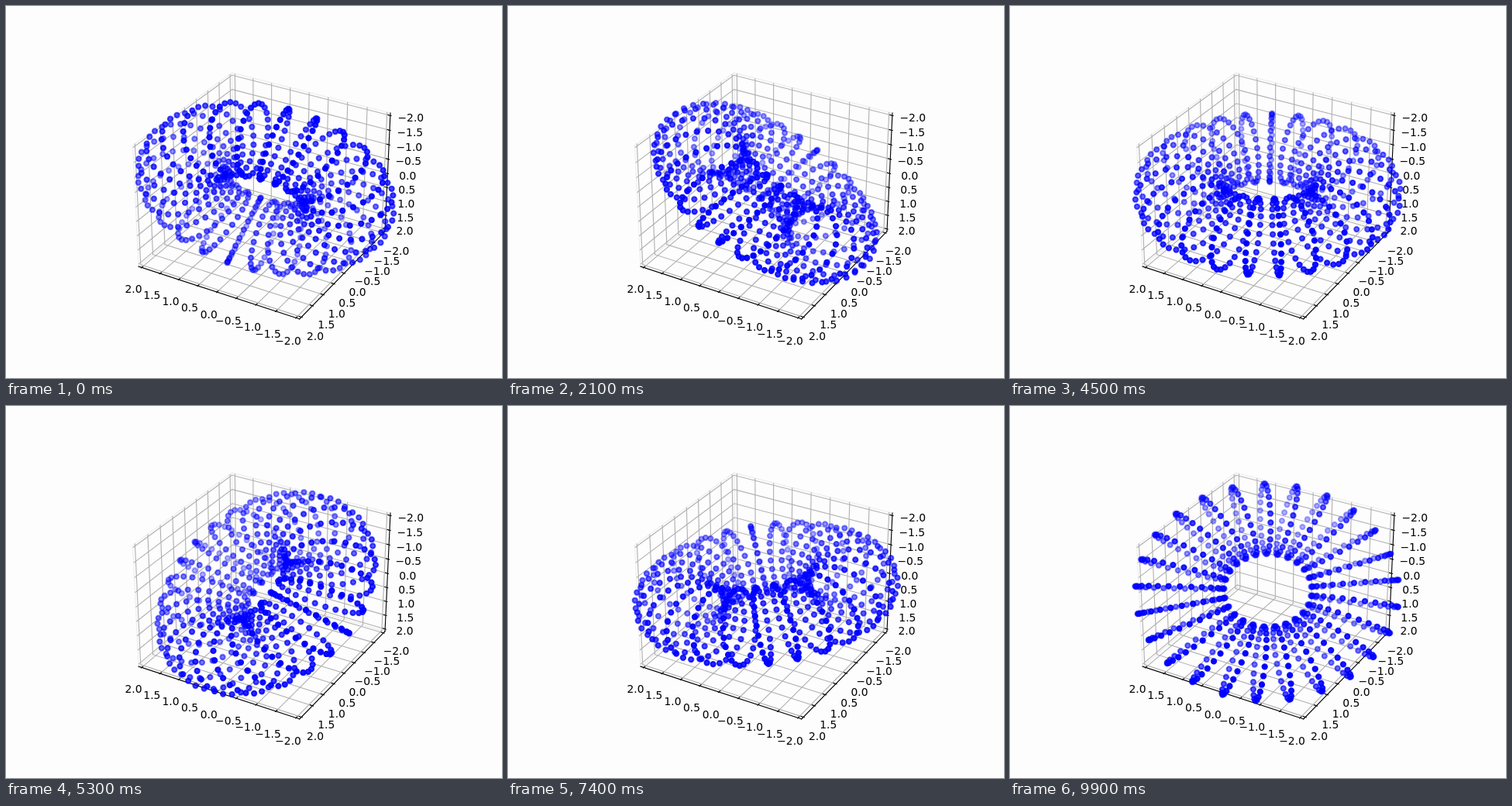
An HTML page with a canvas that plays this animation: 640x480 px, repeating every 10 s.

```html
<!DOCTYPE html>
<html lang="en">
<head>
<meta charset="utf-8">
<title>Rotating torus scatter</title>
<style>
  html, body { margin: 0; width: 100%; height: 100%; overflow: hidden; background: #fdfdfd; }
  svg, canvas { position: absolute; left: 0; top: 0; width: 640px; height: 480px; }
  polyline, polygon { fill: none; }
  .pane { stroke: #f0f0f0; stroke-width: 1.39; }
  .grid { stroke: #b0b0b0; stroke-width: 1.11; }
  .axis { stroke: #000; stroke-width: 1.11; stroke-linecap: square; }
  .tick { stroke: #000; stroke-width: 1.11; }
  text { font: 13.889px "DejaVu Sans", sans-serif; text-anchor: middle; fill: #000; }
</style>
</head>
<body>
<svg id="axes" viewBox="0 0 640 480"></svg>
<canvas id="points" width="640" height="480"></canvas>
<script>
const HALF = [4 / 7, 4 / 7, 3 / 7];           // half size of the plot box
const EDGE = HALF.map(h => h * 25 / 24);      // panes reach a little further
const STEP = HALF.map(h => h / 6);
const BACK = [-1, 1, -1];                     // corner shared by the panes
const LABEL_GAP = 1.037;
const LIMIT = 2;

// Perspective view from elevation 30, azimuth -60, distance 10
const C30 = Math.sqrt(3) / 2;
function project([x, y, z]) {
  const right = C30 * x + 0.5 * y;
  const up = -0.25 * x + C30 / 2 * y + C30 * z;
  const dist = 10 - (C30 / 2 * x - 0.75 * y + 0.5 * z);
  const k = 369.6 / 0.185;
  return { x: 143.2 + (right / dist + 0.095) * k, y: 427.2 - (up / dist + 0.095) * k, dist };
}

// All three axes run from +2 to -2
const toBox = p => p.map((v, i) => -v * HALF[i] / LIMIT);

const svg = document.getElementById("axes");
function add(tag, attrs) {
  const el = document.createElementNS("http://www.w3.org/2000/svg", tag);
  for (const name in attrs) el.setAttribute(name, attrs[name]);
  return svg.appendChild(el);
}
function path(tag, cls, corners) {
  const points = corners.map(project).map(p => p.x.toFixed(2) + "," + p.y.toFixed(2)).join(" ");
  add(tag, { class: cls, points });
}
const corner = signs => signs.map((s, i) => s * EDGE[i]);
function replace(p, i, v) {
  const q = p.slice();
  q[i] = v;
  return q;
}

function drawPane(i) {
  const [j, k] = [0, 1, 2].filter(n => n !== i);
  const quad = [[-1, -1], [1, -1], [1, 1], [-1, 1]].map(([a, b]) =>
    corner(replace(replace(BACK, j, a), k, b)));
  path("polygon", "pane", quad);
}

function drawAxis(i, signs, tickDir) {
  const [j, k] = [0, 1, 2].filter(n => n !== i);
  const base = corner(signs);
  const back = corner(BACK);
  const ticks = [];
  for (let v = -LIMIT; v <= LIMIT; v += 0.5) ticks.push({ v, at: -v * HALF[i] / LIMIT });

  path("polyline", "axis", [replace(base, i, -EDGE[i]), replace(base, i, EDGE[i])]);
  for (const { at } of ticks) {
    const p = replace(back, i, at);
    path("polyline", "grid", [replace(p, j, -p[j]), p, replace(p, k, -p[k])]);
  }
  for (const { v, at } of ticks) {
    const p = replace(base, i, at);
    const shift = f => replace(p, tickDir, p[tickDir] + signs[tickDir] * f * STEP[tickDir]);
    path("polyline", "tick", [shift(0.1), shift(-0.2)]);

    const place = project(p.map((c, n) => n === i ? c : c + signs[n] * LABEL_GAP * STEP[n]));
    const label = add("text", { x: place.x.toFixed(1), y: Math.round(place.y + 11) });
    label.textContent = (v < 0 ? "\u2212" : "") + Math.abs(v).toFixed(1);
  }
}

[0, 1, 2].forEach(drawPane);
drawAxis(0, [0, -1, -1], 1);
drawAxis(1, [1, 0, -1], 0);
drawAxis(2, [1, 1, 0], 0);

// Torus around the y axis, turned about x and then about z by the same angle
const COUNT = 25, MAJOR = 2, MINOR = 1;
function torus(angle) {
  const s = Math.sin(angle), c = Math.cos(angle);
  const points = [];
  for (let i = 0; i < COUNT; i++) {
    const phi = 2 * Math.PI * i / COUNT;
    for (let j = 0; j < COUNT; j++) {
      const theta = 2 * Math.PI * j / COUNT;
      const ring = MAJOR + MINOR * Math.cos(theta);
      const x = ring * Math.cos(phi), y = MINOR * Math.sin(theta), z = ring * Math.sin(phi);
      const y1 = y * c - z * s, z1 = y * s + z * c;
      points.push(project(toBox([x * c - y1 * s, x * s + y1 * c, z1])));
    }
  }
  return points.sort((a, b) => b.dist - a.dist);
}

const ctx = document.getElementById("points").getContext("2d");
ctx.lineWidth = 2.083;
function drawPoints(angle) {
  const points = torus(angle);
  const depth = p => -10 / p.dist;
  const far = depth(points[0]), near = depth(points[points.length - 1]);
  ctx.clearRect(0, 0, 640, 480);
  for (const p of points) {
    const alpha = 1 - 0.7 * (depth(p) - near) / (far - near);
    ctx.fillStyle = ctx.strokeStyle = `rgba(0, 0, 255, ${alpha})`;
    ctx.beginPath();
    ctx.arc(p.x, p.y, 3.106, 0, 2 * Math.PI);
    ctx.fill();
    ctx.stroke();
  }
}

const FRAME_MS = 100, FRAMES = 100;
const start = performance.now();
let shown = -1;
function tick() {
  const frame = Math.floor(Math.max(0, performance.now() - start) / FRAME_MS) % FRAMES;
  if (frame !== shown) {
    shown = frame;
    drawPoints(0.2 + 0.1 * frame);
  }
  requestAnimationFrame(tick);
}
tick();
</script>
</body>
</html>
```
